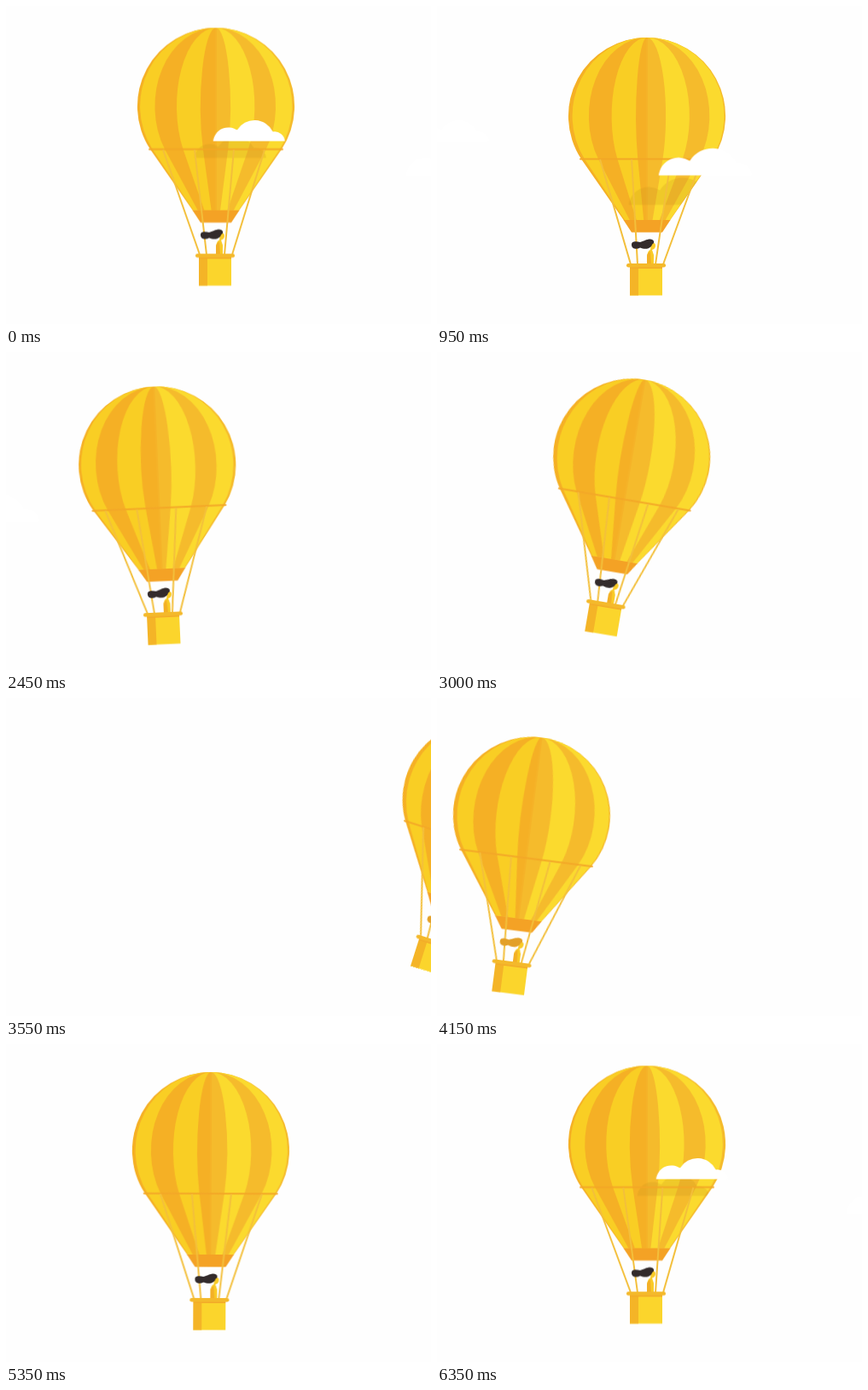
An HTML page without scripts that plays this animation: 498 by 373 pixels, repeating every 6400 ms.

```html
<!DOCTYPE html>
<html lang="en">
<head>
<meta charset="utf-8">
<title>Balloon ride</title>
<style>
@property --spin { syntax: '<angle>'; inherits: true; initial-value: 0deg; }

html, body { margin: 0; width: 100%; height: 100%; overflow: hidden; background: #fefefe; }
svg { display: block; width: 100vw; height: 100vh; }

.drift, .bob, .tilt, .hair, .small, .big { animation: 6.4s linear infinite; }
.drift { animation-name: drift; }
.bob { animation-name: bob; }
.tilt { animation-name: tilt, spin; }
.hair { animation-name: hair; fill: #332b2b; }
.small { animation-name: small; animation-delay: -1s; }
.big { animation-name: big; animation-delay: -.232s; }

/* each stripe edge is a meridian: the outline squeezed by the sine of its angle */
.env use { transform: scaleX(sin(calc(var(--a) + var(--spin)))); }
.env .rim { transform: scaleX(var(--s)); }
.ly { fill: #f9ce24; }
.ld { fill: #f5b025; }
.ry { fill: #fbda2e; }
.rd { fill: #f5bb2c; }
.ropes {
  fill: none; stroke: #f3bf3b; stroke-width: 2;
  transform: translateY(174px) skewX(calc(var(--spin) * -1));
}
.shade { fill: #c9941c; opacity: .25; }
.cloud { fill: #fff; }

@keyframes drift {
  0% { transform: translateX(246px); }
  16.41% { transform: translateX(246px); animation-timing-function: cubic-bezier(.37, 0, .63, 1); }
  37.5% { transform: translateX(177px); animation-timing-function: cubic-bezier(.333, 0, .667, .217); }
  46.875% { transform: translateX(228px); animation-timing-function: cubic-bezier(.333, .228, .667, .486); }
  50.78% { transform: translateX(301px); animation-timing-function: cubic-bezier(.333, .175, .667, .514); }
  55.47% { transform: translateX(555.5px); }
  57.8% { transform: translateX(750px); }
  57.81% { transform: translateX(-130px); animation-timing-function: cubic-bezier(.333, .8, .667, .897); }
  71.875% { transform: translateX(186px); animation-timing-function: cubic-bezier(.333, .44, .667, .88); }
  81.25% { transform: translateX(236px); animation-timing-function: cubic-bezier(.333, .8, .667, 1); }
  93.75%, 100% { transform: translateX(246px); }
}
@keyframes bob {
  0% { transform: translateY(117.5px); animation-timing-function: cubic-bezier(.37, 0, .63, 1); }
  28.125% { transform: translateY(138.5px); animation-timing-function: cubic-bezier(.37, 0, .63, 1); }
  54.69%, 57.8% { transform: translateY(119.5px); }
  57.81% { transform: translateY(137px); }
  67.19% { transform: translateY(137.8px); animation-timing-function: cubic-bezier(.37, 0, .63, 1); }
  95.3%, 100% { transform: translateY(117.5px); }
}
@keyframes tilt {
  0% { transform: rotate(0deg); }
  15.6% { transform: rotate(0deg); animation-timing-function: cubic-bezier(.37, 0, .63, 1); }
  28.9% { transform: rotate(-8.9deg); animation-timing-function: cubic-bezier(.37, 0, .63, 1); }
  57.8% { transform: rotate(18deg); }
  57.81% { transform: rotate(15deg); animation-timing-function: cubic-bezier(.333, .5, .667, .87); }
  71.875% { transform: rotate(3deg); animation-timing-function: cubic-bezier(.2, .5, .6, 1); }
  87.5%, 100% { transform: rotate(0deg); }
}
@keyframes spin {
  0%, 100% { --spin: 0deg; }
  14.84% { --spin: 3.3deg; }
  28.9% { --spin: -4.8deg; }
  46.875% { --spin: 3.3deg; }
  71.875% { --spin: 3.5deg; }
  99.2% { --spin: -1.3deg; }
}
@keyframes hair {
  0%, 51% { fill: #332b2b; }
  54%, 65% { fill: #e3a028; }
  71.875% { fill: #cc902c; }
  77%, 100% { fill: #332b2b; }
}
@keyframes small {
  from { transform: translateX(523px); }
  to { transform: translateX(-1269px); }
}
@keyframes big {
  from { transform: translateX(520px); }
  to { transform: translateX(-888px); }
}
</style>
</head>
<body>
<svg viewBox="0 0 498 373" preserveAspectRatio="none">
  <defs>
    <path id="half" d="M0-92A92 92 0 0 1 77 50.5L27 122.5H0Z"/>
    <path id="cloud" d="M0 24A18 18 0 0 1 28 11A24 24 0 0 1 70 13A12 12 0 0 1 84 24Z"/>
    <clipPath id="skin"><path d="M-77 50.5A92 92 0 1 1 77 50.5L27 122.5H-27Z"/></clipPath>
  </defs>

  <g class="drift"><g class="bob"><g class="tilt">
    <g class="env">
      <use href="#half" class="ld rim" style="--s:-1"/>
      <use href="#half" class="ly" style="--a:-75deg"/>
      <use href="#half" class="ld" style="--a:-51deg"/>
      <use href="#half" class="ly" style="--a:-30deg"/>
      <use href="#half" class="ld" style="--a:-11.3deg"/>
      <use href="#half" class="rd rim" style="--s:1"/>
      <use href="#half" class="ry" style="--a:76deg"/>
      <use href="#half" class="rd" style="--a:49.5deg"/>
      <use href="#half" class="ry" style="--a:29.5deg"/>
      <use href="#half" class="rd" style="--a:10.6deg"/>
      <path d="M0-91.5V122.5" stroke="#f5b328" stroke-width="2"/>
    </g>

    <g clip-path="url(#skin)" class="shade">
      <g class="small"><use href="#cloud" x="-268" y="36.5"/></g>
      <g class="big"><use href="#cloud" transform="translate(-281 73) scale(1.3)"/></g>
    </g>

    <path d="M-27.5 122H27.5L18 136.5H-18Z" fill="#f4a225"/>
    <path d="M-78 50.5H78" stroke="#f3a726" stroke-width="2" stroke-linecap="round"/>
    <path class="ropes" d="M-62-123L-19 0M-25-123L-11 0M21-123L10 0M57-123L19 0"/>

    <path d="M5 149Q10 148 10 152Q10 156 6 157L8 163V174H0V164Q1 158 4 157Z" fill="#f9cb27"/>
    <path d="M0 164Q1 160 4 159L5 174H0Z" fill="#f3b027"/>
    <path class="hair" d="M-18 151C-18 146-12 147-8 148C-4 147-1 144.5 4 144.5Q9 145 8 149Q6 150 5 153C1 157-4 156-8 154.5C-12 157-18 156-18 151Z"/>

    <path d="M-20 176H18V210.5H-20Z" fill="#fbd52c"/>
    <path d="M-20 176H-10V210.5H-20Z" fill="#f4b427"/>
    <path d="M-20 177H18V179H-20Z" fill="#f3ab28"/>
    <rect x="-24" y="173" width="46" height="4.5" rx="2.2" fill="#f4b92b"/>
  </g></g></g>

  <g class="cloud">
    <g class="small"><use href="#cloud" y="134.5"/></g>
    <g class="big"><use href="#cloud" transform="translate(0 167.5) scale(1.3)"/></g>
  </g>
</svg>
</body>
</html>
```
